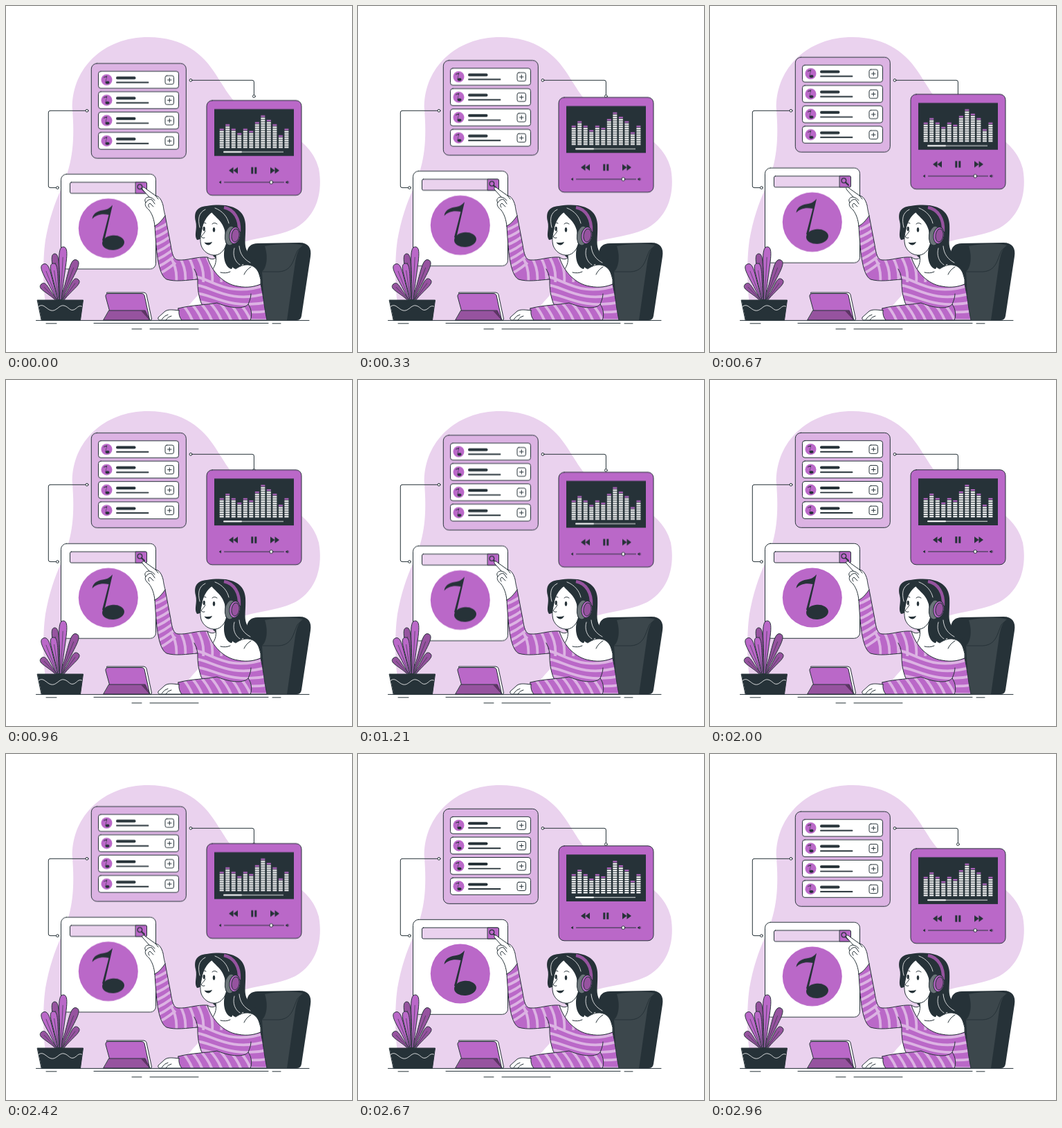
An HTML page that plays this animation: 500x500 px, repeating every 3000 ms.

```html
<!DOCTYPE html>
<html lang="en">
<head>
<meta charset="utf-8">
<title>Music search</title>
<style>
  html, body { margin: 0; width: 100%; height: 100%; overflow: hidden; background: #fff; }
  svg { display: block; width: 100vw; height: 100vh; }
  .ink { fill: #263238; }
  .violet { fill: #ba68c8; }
  .deep { fill: #96539f; }
  .pale { fill: #ead2ee; }
  .mid { fill: #dcb3e3; }
  .white { fill: #fff; }
  .line { stroke: #263238; stroke-width: 1; stroke-linecap: round; stroke-linejoin: round; }
  .open { fill: none; }
  .shine { fill: none; stroke: #fff; stroke-width: .8; stroke-linecap: round; }
  .stripes { fill: none; stroke: #dcb3e3; stroke-width: 3.8; }
  #panels { animation: float 1.5s linear -25ms infinite; }
  @keyframes float { 50% { transform: translateY(-10px); } }
</style>
</head>
<body>
<svg viewBox="0 0 500 500">
  <defs>
    <path id="sweater" d="M230 303L238 345C240 358 242 367 249 367C262 368 275 362 291 363C298 385 315 402 335 405C350 408 360 405 368 402C372 418 373 436 377 454H295C287 440 276 425 277 395C262 396 245 399 232 395C219 388 217 350 215 318Z"/>
    <path id="cuff" d="M249 437C268 432 290 432 305 429C319 435 342 440 350 431C355 438 356 448 353 454H253C249 449 248 442 249 437Z"/>
    <clipPath id="inSweater"><use href="#sweater"/></clipPath>
    <clipPath id="inCuff"><use href="#cuff"/></clipPath>
    <g id="note" class="ink">
      <ellipse cx="155" cy="342.4" rx="16" ry="10.6" transform="rotate(-4 155 342.4)"/>
      <path d="M154 288L142 340L139 339L148.500 302C138 300 130 302 124.500 308C126 298 135 296 142 295C148 294 151 291 154 288Z"/>
    </g>
  </defs>

  <path class="pale" d="M62 454C52 420 53 365 57 338C62 310 70 285 80 264C98 225 99 190 96 150C94 95 135 48 200 45C255 43 285 70 302 97C315 117 322 130 333 141C350 158 440 180 452 235C458 268 450 303 418 321C385 337 345 334 325 350C300 375 295 400 278 417C265 432 258 438 252 454Z"/>

  <g class="line open">
    <path d="M117 151.300H64Q61.300 151.300 61.300 154V260Q61.300 262.600 64 262.600H74"/>
    <path d="M267 107.300H356Q358.400 107.300 358.400 110V130"/>
    <g class="white">
      <circle cx="117" cy="151.300" r="1.900"/><circle cx="74.500" cy="262.600" r="1.900"/>
      <circle cx="267" cy="107.300" r="1.900"/><circle cx="358.400" cy="130.500" r="1.900"/>
    </g>
  </g>

  <g id="panels">
    <rect class="mid line" x="123.300" y="83.300" width="137" height="137" rx="8"/>
    <g id="rows"></g>

    <rect class="violet line" x="290" y="136.800" width="137" height="137" rx="8"/>
    <rect class="ink" x="301" y="149.300" width="115" height="67.700"/>
    <g id="bars"></g>
    <path d="M315 211.200H401" stroke="#fff" stroke-width=".9"/>
    <path d="M315 211.200H340" stroke="#fff" stroke-width="2" stroke-linecap="round"/>
    <g class="ink">
      <path d="M328.500 233.300V242.700L322 238ZM335 233.300V242.700L328.500 238Z"/>
      <path d="M354.300 233.300h3v9.400h-3zM359.300 233.300h3v9.400h-3z"/>
      <path d="M382 233.300V242.700L388.500 238ZM388.500 233.300V242.700L395 238Z"/>
      <path d="M308 254.200h1l2-1.500v4.600l-2-1.500h-1zM404 254.200h1l2-1.500v4.600l-2-1.500h-1z"/>
    </g>
    <path class="line open" d="M315.500 255H401.500M408 253.800v2.400"/>
    <circle class="white line" cx="383.300" cy="255" r="2.400"/>

    <rect class="white line" x="79.500" y="243.300" width="137" height="137" rx="8"/>
    <rect class="pale line" x="92.500" y="255" width="111" height="16" rx="2"/>
    <path class="violet line" d="M187.500 255H201.500Q203.500 255 203.500 257V269Q203.500 271 201.500 271H187.500Z"/>
    <g class="line open">
      <circle cx="193.400" cy="261.500" r="3.300" style="stroke-width:1.300"/>
      <path d="M196 264.200L200 268" style="stroke-width:2"/>
    </g>
    <circle class="violet" cx="147.800" cy="321.500" r="43"/>
    <use href="#note"/>
  </g>

  <!-- chair -->
  <path class="ink" d="M345 454L348 357C349 348 354 343 364 343L424 342C437 342 442 350 440 362L427 448Q426 454 420 454Z"/>
  <path fill="#3c474c" d="M374 347C395 343 418 343 429 346C422 350 420 360 418 370L406 454H374L370 384C377 378 379 362 374 347Z"/>
  <path class="line open" d="M355 384H394C414 383 415 366 421 354Q424 349 432 347"/>

  <!-- plant -->
  <g id="leaves"></g>
  <path class="ink line" d="M45.500 425H111.500L107.500 454H51.500Z"/>
  <path class="shine" d="M47.500 434C54 429 58 438 65 440C73 442 77 431 84 433C91 435 92 441 98 439C103 437 104 432 109.500 434"/>

  <!-- tablet -->
  <path class="white line" d="M146 414H199Q202 414 203 417L210.500 452Q211 454 208 454H154Z"/>
  <path class="violet line" d="M148 415.500H196Q199 415.500 200 418L207.500 453H153L144 420Q143.500 415.500 148 415.500Z"/>
  <path class="deep line" d="M149 440H201L207.500 454H141Z"/>
  <path fill="#5d3464" d="M195 440.500H201L207 453.500Z"/>

  <!-- woman -->
  <path class="ink" d="M276 338C271 331 277 322 274 311C271 298 276 290 290 289C330 283 345 297 346 315C347 335 343 345 349 355C354 365 362 369 371 369C363 378 350 378 342 373C338 380 327 382 323 374L300 362L285 330C284 334 281 338 276 338Z"/>
  <path class="white line" d="M318 345C318 362 322 376 332 380C347 369 362 374 366 388Q369 395 368 403L340 412L300 402L291 363Q298 368 303 364L302 355Z"/>
  <path class="line open" d="M303 360C305 371 301 378 297 382M310 385Q318 387 324 384M354 377Q347 381 344 388"/>
  <path class="white line" d="M297 298C289 304 284 314 283 323C281 331 280 338 282 346C285 355 294 361 303 360C311 359 317 351 319 342L318 322C315 312 306 306 302 299Z"/>
  <path class="ink" d="M294 294C301 305 312 309 316 324L318 344C313 355 314 373 323 379C328 382 328 377 325 371C323 360 334 357 342 344L340 305L310 289Z"/>
  <path class="shine" d="M288 294C278 299 277 308 280 320M302 292C313 296 320 305 322 314M337 347C338 359 344 366 353 371M330 350C327 360 331 370 338 374"/>
  <g class="ink">
    <ellipse cx="286.200" cy="322" rx="1.600" ry="3.200"/>
    <ellipse cx="300.500" cy="323.300" rx="1.700" ry="3.400"/>
    <path d="M286.500 341.500Q293 343 298 340.700Q296 345.500 292 345.500Q288.500 345 286.500 341.500Z"/>
  </g>
  <path class="line open" d="M288 325C286 330 281.500 332 282.500 334Q284 336 287 335M284 314Q286 312 289 314M298 315Q301 312 305 315"/>
  <path class="line open" d="M316 291C330 294 338 308 337 324" style="stroke-width:6;stroke-linecap:butt"/>
  <path d="M315 291C330 294 338 308 337 326" fill="none" stroke="#96539f" stroke-width="4.400"/>
  <ellipse class="line" fill="#6c757a" cx="324.500" cy="332" rx="8" ry="14" transform="rotate(8 324.500 332)"/>
  <ellipse class="violet line" cx="330.500" cy="331.500" rx="7.700" ry="12" transform="rotate(8 330.500 331.500)"/>
  <ellipse class="deep line" cx="331.500" cy="331.500" rx="5.500" ry="9.500" transform="rotate(8 331.500 331.500)"/>

  <use href="#sweater" class="violet"/>
  <g clip-path="url(#inSweater)"><path id="armStripes" class="stripes"/><path id="bodyStripes" class="stripes"/></g>
  <use href="#sweater" class="line open"/>
  <path class="line open" d="M277 395Q276 386 272 380M350 431Q354 422 354 416"/>
  <use href="#cuff" class="violet"/>
  <g clip-path="url(#inCuff)"><path id="cuffStripes" class="stripes"/></g>
  <use href="#cuff" class="line open"/>

  <path class="white line" d="M215 318C214 309 212 302 207 295C202 291 200 287 202 284C199 280 202 276 207 276L198 266C195 262 198 260 202 264L216 274C222 275 225 281 227 288C228 295 229 299 230 303C225 310 221 315 215 318Z"/>
  <path class="line open" d="M207 276Q212 277 215 281M202 284Q206 278 211 280L215 286M207 291Q204 287 208 285L213 290M216 274L220 279"/>
  <path class="white line" d="M250 440C241 439 235 438 230 441L220 450Q219 454 223 454H254Q249 448 250 440Z"/>
  <path class="line open" d="M225 453Q229 447 234 446M231 454Q234 449 239 448"/>

  <path class="line open" d="M43.500 454.400H438M58 458.800H73M127 458.400H379M385 458.800H397M182 466.800H196M208 466.800H278"/>
</svg>

<script>
  const byId = id => document.getElementById(id);
  const times = (n, fn) => Array.from({ length: n }, (_, i) => fn(i)).join('');

  const row = i => `<g transform="translate(0 ${i * 29.4})">
    <rect class="white line" x="133.500" y="94.700" width="116" height="24.500" rx="3.500"/>
    <circle class="violet" cx="145.500" cy="107" r="8"/>
    <use href="#note" transform="translate(117.400 46.500) scale(.188)"/>
    <path class="line" d="M161 104.200H185.500" style="stroke-width:4"/>
    <path class="line" d="M160 110.800H205.500" style="stroke-width:1.900"/>
    <rect class="white line" x="230" y="101" width="12.500" height="12.300" rx="2.500"/>
    <path class="line" d="M233.500 107.100H239M236.250 104.400V109.800"/></g>`;
  byId('rows').innerHTML = times(4, row);

  const levels = [9, 11, 9, 7, 9, 8, 12, 15, 13, 11, 6, 9];
  byId('bars').innerHTML = levels.map((n, b) => times(n, k =>
    `<rect x="${308.7 + b * 8.52}" y="${203.3 - k * 3.2}" width="6" height="2.100" fill="${k === n - 1 ? '#ba68c8' : '#fff'}"/>`)).join('');

  // A leaf rises on a thin stalk and swells towards its rounded tip.
  function leaf(tx, ty, bx, by, w, tone) {
    const dx = tx - bx, dy = ty - by, len = Math.hypot(dx, dy);
    const at = (t, s) => `${bx + dx * t - dy / len * w * s} ${by + dy * t + dx / len * w * s}`;
    return `<path class="${tone} line" d="M${at(0, .2)}C${at(.55, .3)} ${at(1, 1.6)} ${at(1, 0)}C${at(1, -1.6)} ${at(.55, -.3)} ${at(0, -.2)}Z"/>
      <path class="line open" style="stroke-width:.6" d="M${at(0, 0)}L${at(.8, 0)}"/>`;
  }
  byId('leaves').innerHTML = [
    [70, 358, 77, 424, 6, 'deep'], [102, 367, 80, 424, 7, 'deep'],
    [54, 373, 74, 424, 7, 'violet'], [83, 348, 79, 424, 7, 'violet'],
    [104, 395, 83, 424, 6, 'deep'], [51, 402, 72, 424, 6, 'deep'],
    [68, 372, 76, 424, 6, 'violet']
  ].map(a => leaf(...a)).join('');

  const stripe = (id, n, fn) => byId(id).setAttribute('d', times(n, fn));
  stripe('armStripes', 13, i => i < 7
    ? `M212 ${324 + i * 11}Q226 ${321 + i * 11} 245 ${305 + i * 11}`
    : `M${238 + (i - 7) * 13} 363Q${248 + (i - 7) * 13} 380 ${246 + (i - 7) * 13} 399`);
  stripe('bodyStripes', 7, i =>
    `M272 ${391 + i * 12}C295 ${392 + i * 11} 320 ${424 + i * 8} 378 ${402 + i * 13}`);
  stripe('cuffStripes', 8, i =>
    `M${250 + i * 14} 426Q${264 + i * 14} 440 ${270 + i * 14} 456`);
</script>
</body>
</html>
```
